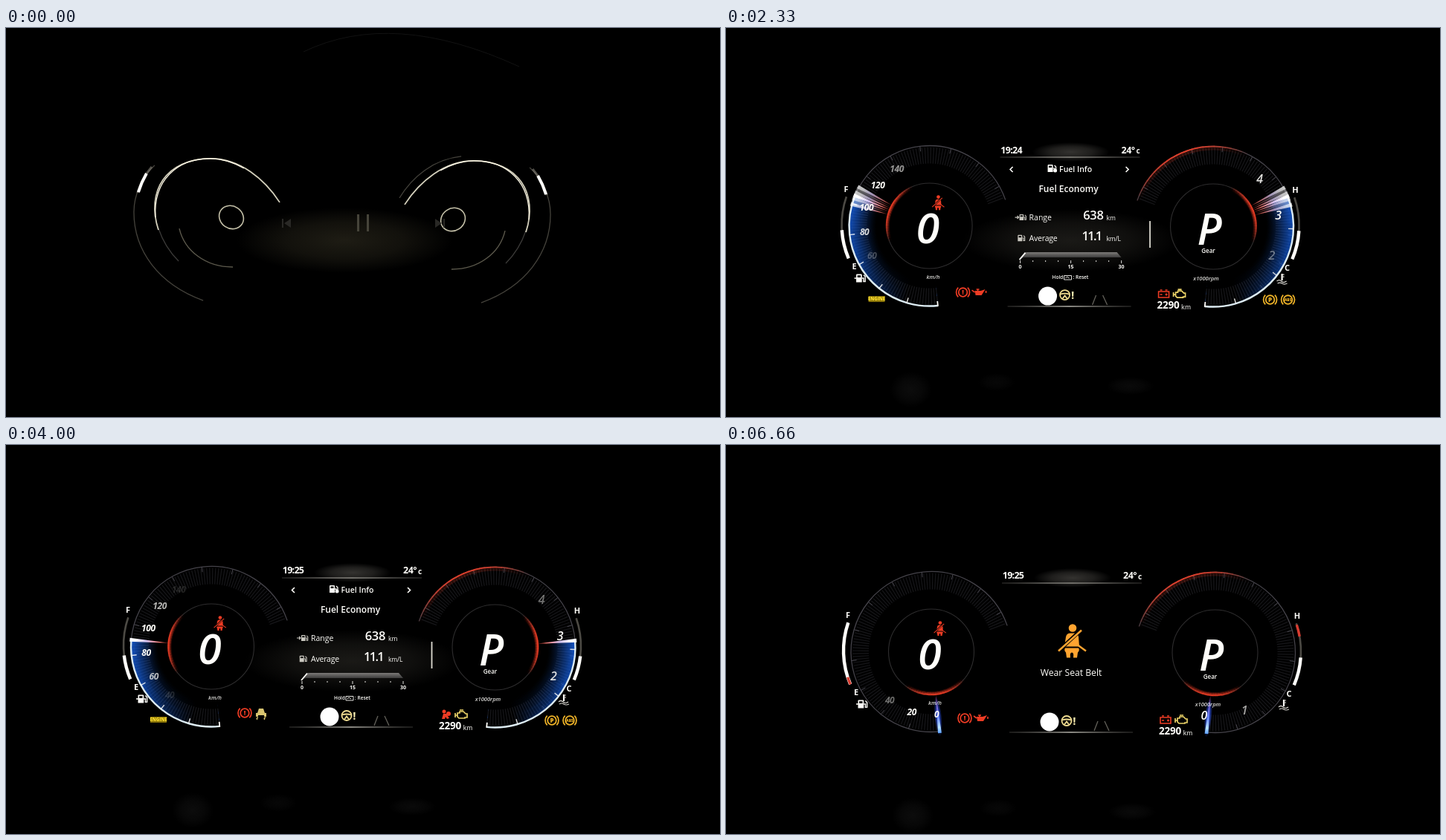
These frames come from a looping animation (960x524 px, 6.69 s). An HTML page with a canvas:

```html
<!DOCTYPE html>
<html lang="en">
<head>
<meta charset="utf-8">
<title>Instrument cluster</title>
<style>
html, body { margin: 0; width: 960px; height: 524px; overflow: hidden; background: #000; }
canvas { display: block; }
</style>
</head>
<body>
<canvas id="stage" width="960" height="524"></canvas>
<script>
const c = document.getElementById('stage').getContext('2d');
const LOOP = 6690, RAD = Math.PI / 180, ZERO = 84, R = 108;
const WHITE = '#fffefa', DIM = '#3b3a38', RED = '#ee3c24', AMBER = '#f0b428';

const clamp = v => Math.max(0, Math.min(1, v));
const ramp = (t, a, b) => clamp((t - a) / (b - a));

// Piecewise linear value through [time, value] points
function track(t, pts) {
  let v = pts[0][1];
  for (let i = 1; i < pts.length; i++) {
    const [a, x] = pts[i - 1], [b, y] = pts[i];
    if (t >= a) v = x + (y - x) * ramp(t, a, b);
  }
  return v;
}

function group(x, y, draw, { sx = 1, sy = 1, a = 1 } = {}) {
  c.save();
  c.translate(x, y);
  c.scale(sx, sy);
  c.globalAlpha *= a;
  draw();
  c.restore();
}

// y is the middle of the capitals
function text(s, x, y, size, { w = 700, color = WHITE, align = 'center', italic = '', gap = 0, a = 1 } = {}) {
  c.save();
  c.font = `${italic} ${w} ${size}px "Open Sans", "Noto Sans", sans-serif`;
  c.letterSpacing = gap + 'px';
  c.textAlign = align;
  c.globalAlpha *= a;
  c.fillStyle = color;
  c.fillText(s, x, y + size * .357);
  c.restore();
}

function stroke(d, color, width = 1, a = 1) {
  c.save();
  c.globalAlpha *= a;
  c.strokeStyle = color;
  c.lineWidth = width;
  c.stroke(new Path2D(d));
  c.restore();
}

function fill(d, color) {
  c.fillStyle = color;
  c.fill(new Path2D(d));
}

function disc(x, y, r, color) {
  c.beginPath();
  c.arc(x, y, r, 0, 7);
  c.fillStyle = color;
  c.fill();
}

function arc(r, from, to, color, width = 1, a = 1) {
  c.save();
  c.globalAlpha *= a;
  c.beginPath();
  c.arc(0, 0, r, from * RAD, to * RAD);
  c.strokeStyle = color;
  c.lineWidth = width;
  c.stroke();
  c.restore();
}

function tick(angle, r1, r2, color, width, a = 1) {
  const x = Math.cos(angle * RAD), y = Math.sin(angle * RAD);
  stroke(`M${x * r1} ${y * r1}L${x * r2} ${y * r2}`, color, width, a);
}

function glow(x, y, rx, ry, rgb, a) {
  group(x, y, () => {
    const g = c.createRadialGradient(0, 0, 0, 0, 0, 1);
    g.addColorStop(0, `rgba(${rgb},${a})`);
    g.addColorStop(.55, `rgba(${rgb},${a * .6})`);
    g.addColorStop(1, `rgba(${rgb},0)`);
    disc(0, 0, 1, g);
  }, { sx: rx, sy: ry });
}

function fadeLine(x1, x2, y, a = 1) {
  const g = c.createLinearGradient(x1, 0, x2, 0);
  g.addColorStop(0, 'rgba(90,88,84,.4)');
  g.addColorStop(.5, '#b8b6ae');
  g.addColorStop(1, 'rgba(90,88,84,.4)');
  stroke(`M${x1} ${y}H${x2}`, g, 1.5, a);
}

// Welcome arcs, left half; the right half is its mirror image
function welcomeHalf(right) {
  stroke('M265 367C205 345 172 300 172 248C172 225 183 200 200 185', '#45433c', 1.3);
  stroke('M177 222Q183 202 196 187', '#88857c', 3, .6);
  stroke('M178 221Q182 208 189 196', WHITE, 4);
  stroke('M232 314C222 304 211 288 205 270', DIM, 1.3);
  stroke('M205 272C188 220 215 176 275 176C315 176 348 204 368 235', '#d4d0bc', 1.8);
  stroke('M201 255C198 205 230 176 275 176C290 176 305 181 320 189', '#fffae8', 1.2);
  stroke('M233 270C240 300 268 322 305 322', '#5c594c', 1.4);
  if (right) stroke('M375 226C358 198 330 174 292 170', '#45433c', 1.2);
  c.beginPath();
  c.ellipse(303, 255, 17, 15, .6, 0, 7);
  c.strokeStyle = '#c4c0a8';
  c.lineWidth = 1.6;
  c.stroke();
}

function welcome(t) {
  const p = ramp(t, 0, 620), a = 1 - ramp(t, 60, 620);
  if (!a) return;
  for (const right of [false, true]) {
    group(right ? 904 : 0, right ? 3 : 0, () => {
      c.translate(270, 262);
      c.rotate(-p * .7);
      c.scale(1 + p * .18, 1 + p * .18);
      c.translate(-270, -262);
      welcomeHalf(right);
    }, { sx: right ? -1 : 1, a });
  }
  stroke('M400 32Q520 -26 690 52', '#121212', 1, a);
  group(0, 0, () => {
    fill('M472 251h3v23h-3zM485 251h3v23h-3z', '#46443a');
    fill('M371 257h2v12h-2zM383 257v12l-9-6zM577 257v12l9-6zM588 257h2v12h-2z', '#2a2926');
  }, { a: 1 - ramp(t, 0, 250) });
}

function needle(angle, a, rest) {
  const g = c.createRadialGradient(0, 0, 54, 0, 0, R + 3);
  g.addColorStop(0, 'rgba(255,50,30,0)');
  g.addColorStop(.25, rest ? '#8458c0' : '#f07068');
  g.addColorStop(.6, rest ? '#6a88ff' : '#d4c4f4');
  g.addColorStop(.85, rest ? '#b8e4ff' : '#fff');
  g.addColorStop(1, rest ? '#5098ff' : '#fff');
  c.save();
  c.rotate(angle * RAD);
  c.globalAlpha *= a;
  fill(`M54 0L${R + 2} -2.4V2.4Z`, g);
  c.restore();
}

// Drawn for the left dial; the caller mirrors it for the right one
function dial(t, s, dim, lit, right) {
  arc(R, ZERO, 341, '#45434a', 1.3, dim);
  arc(57.5, 0, 360, '#2e2d2e', 1.1, dim);
  for (let d = 0; d <= 256; d += 2.2) tick(ZERO + d, R - 24, R - 2, '#17171a', 1.2, dim * lit);
  for (let d = 22.4; d < 256; d += 22.4) tick(ZERO + d, R - 7, R, '#4a4850', 1, dim * lit);
  if (right) {
    for (let i = 0; i < 24; i++) {
      const near = Math.sin((i + .5) / 24 * Math.PI);
      arc(R, 245 + i * 4, 249.3 + i * 4, '#e0402c', 2, lit * near);
      arc(R - 3, 245 + i * 4, 249.3 + i * 4, '#e0402c', 4, lit * near * .2);
    }
  }
  if (!lit) return;
  c.save();
  c.globalAlpha *= lit;
  const end = ZERO + s;
  if (s > 1) {
    const g = c.createConicGradient(ZERO * RAD, 0, 0);
    g.addColorStop(s * .2 / 360, 'rgba(18,92,220,0)');
    g.addColorStop(s * .65 / 360, 'rgba(18,92,220,.85)');
    g.addColorStop(s / 360, 'rgba(24,100,235,1)');
    for (let r = 72; r < R; r++) arc(r, ZERO, end, g, 1.4, .75 * ((r - 71) / 36) ** 1.5);
    arc(R, ZERO, end, '#dcebf2', 2.4);
    tick(ZERO, R - 6, R + 1, WHITE, 1.8);
    for (let d = 22.4; d < s; d += right ? 36 : 22.4) tick(ZERO + d, R - 7, R, WHITE, 1.4, .8);
  }
  for (let i = -12; i < 12; i++) {
    const near = Math.cos((i + .5) / 12 * Math.PI / 2), from = end + i * 3.6;
    for (let k = 0; k < 4; k++) arc(58 - k * 1.2, from, from + 3.9, RED, 1.6, near * (1 - k * .27));
  }
  const moving = t > 1800 && t < 3500;
  if (moving) for (let i = -3; i <= 3; i++) needle(end + i * 2.2, i % 2 ? .75 : .35, s < 30 && i < 1);
  if (s < 30) {
    c.save();
    c.rotate(end * RAD);
    glow(88, 0, 27, 5 + Math.min(s, 14) * .4, '50,90,255', .85);
    c.restore();
  }
  needle(end, 1, s < 5);
  c.restore();
}

function numbers(values, cx, cy, r, zero, step, s, size) {
  values.forEach((v, i) => {
    const d = i * Math.abs(step), angle = (zero + i * step) * RAD;
    const shine = clamp(1.08 - (Math.abs(d - s) - 20) / 38);
    text(v, cx + Math.cos(angle) * r, cy + Math.sin(angle) * r, size,
      { italic: 'italic', w: size > 14 ? 600 : 700, a: shine, gap: -.4 });
  });
}

function sideBar(level, warn, dim, lit) {
  arc(116, 157, 199, '#4c4a44', 2.6, dim);
  if (level > 0) arc(116, 157, 157 + 42 * level, WHITE, 4.4, lit);
  if (warn) arc(116, ...warn, '#d83c30', 3.4, lit);
}

function belt(color) {
  disc(1, -17, 5.3, color);
  fill('M-8 -5Q-7 -10 -2 -10H4Q8 -10 9 -5L10 8H-10Z', color);
  fill('M-9 10H9Q11 13 8 16L7 23H2Q3 16 0 16Q-3 16 -2 23H-7L-8 16Q-11 13 -9 10Z', color);
  stroke('M13 -15L-17 13', '#000', 5);
  stroke('M13 -14L-18 14M8 6L19 14', color, 2.4);
}

function pump(color) {
  fill('M-5 5V-4Q-5 -5 -4 -5H1Q2 -5 2 -4V5Z', color);
  fill('M-3.5 -3.5H.5V-1H-3.5Z', '#000');
  stroke('M2 0H4V4H6V-2L4 -4', color, 1.3);
}

function ringLamp(x, y, label, color, size) {
  group(x, y, () => {
    arc(5.8, 0, 360, color, 1.8);
    arc(9, 135, 225, color, 1.7);
    arc(9, -45, 45, color, 1.7);
    text(label, 0, 0, size, { w: 800, color });
  });
}

function lamps(t) {
  const swapped = t > 3400 && t < 4700;
  ringLamp(320, 357, '!', RED, 9);
  group(342, 357, () => {
    if (swapped) {
      fill('M-5 0L-3 -6H3L5 0H7V5H4V3H-4V5H-7V0Z', '#d8c470');
      stroke('M-5 9Q-7 7 -4 6M5 9Q3 7 6 6', '#d8c470', 1.4);
    } else {
      fill('M-6 -2H2L8 -4L3 4H-5Z', RED);
      stroke('M-6 0L-10 -3M-2 -2V-4M-4 -4H0M9 -2V1', RED, 1.6);
    }
  });
  group(590, 359, () => {
    if (swapped) {
      disc(-2, -4, 2.5, RED);
      fill('M-5 6L-3 -1L1 -1L5 5L2 6L0 3L-1 6Z', RED);
      disc(4, -1, 3, RED);
    } else {
      stroke('M-7 -3H7V5H-7ZM-5 -5H-2M2 -5H5M-5 1H-2M2 1H5M3.5 -.5V2.5', RED, 1.6);
    }
  });
  group(611, 359, () => stroke('M-5 -2H-2V-4H3L6 -1H8V4H5V5H-3L-5 3ZM-8 -2V4M-8 1H-5M-2 -6H3', '#ecd468', 1.7));
  if (t < 4700) {
    fill('M193 362H215V370H193Z', '#8a7408');
    text('ENGINE', 204, 366, 6, { w: 800, color: '#ffe030' });
    ringLamp(733, 367, 'P', AMBER, 8);
    ringLamp(757, 367, 'ABS', AMBER, 5);
  }
  group(286.5, 236, () => belt(RED), { sx: .44, sy: .44 });
  disc(434, 362, 12.5, '#fff');
  group(457, 360.5, () => {
    arc(6.5, 0, 360, '#f0dc90', 1.8);
    stroke('M-6 -1Q0 -3 6 -1M-3 5L0 1L3 5', '#f0dc90', 1.8);
    text('!', 10.5, 0, 15, { color: '#f8ecb0' });
  });
  stroke('M494 374L499 361M508 361L514 374', '#63615a', 1.3);
}

function fuelInfo() {
  glow(465, 287, 145, 42, '58,56,50', .45);
  stroke('M387 188L383.5 191.5L387 195M539 188L542.5 191.5L539 195', WHITE, 1.6);
  group(439, 190, () => pump(WHITE));
  disc(444, 193, 2.5, WHITE);
  text('Fuel Info', 471.5, 191.5, 10.5, { w: 600 });
  text('Fuel Economy', 462, 217.5, 12, { w: 600 });
  group(400, 256, () => pump('#cac8c0'), { sx: .8, sy: .8 });
  stroke('M390 256H395M393 254L395 256L393 258', '#cac8c0', 1.2);
  group(398, 284, () => pump('#cac8c0'), { sx: .85, sy: .85 });
  text('Range', 409, 256, 10.5, { w: 500, align: 'left' });
  text('Average', 409, 284, 10.5, { w: 500, align: 'left', gap: -.2 });
  text('638', 509, 253.5, 16.5, { w: 600, align: 'right', gap: -.3 });
  text('km', 513, 256.5, 8.5, { w: 500, align: 'left' });
  text('11.1', 506, 281.5, 16.5, { w: 600, align: 'right', gap: -1.7 });
  text('km/L', 513, 284.5, 8.5, { w: 500, align: 'left', gap: -.2 });
  const g = c.createLinearGradient(0, 303, 0, 312);
  g.addColorStop(0, '#7c7a78');
  g.addColorStop(1, '#2a2a2a');
  fill('M397 312L405 303H527L533 310H402Z', g);
  stroke('M396 313L404 303.5', WHITE, 1.8);
  for (let i = 0; i <= 8; i++) stroke(`M${397 + i * 17} 314v${i % 4 ? 2 : 4}`, WHITE, 1.2, .75);
  ['0', '15', '30'].forEach((s, i) => text(s, 397 + i * 68, 322, 7));
  text('Hold', 440, 337, 6.5, { w: 600, align: 'left' });
  stroke('M456 334.5H466V340H456ZM458 338L460 336L463 338', WHITE, .9);
  text(': Reset', 468, 337, 6.5, { w: 600, align: 'left' });
  stroke('M571.5 261V297', '#dcdad0', 1.8);
}

function beltNotice(t) {
  const p = ramp(t, 5500, 5900), a = ramp(t, 5350, 5450);
  if (!a) return;
  const color = `rgb(${212 + 43 * p},${48 + 116 * p},${36 + 12 * p})`;
  group(464, 252.5, () => belt(color), { a });
  text('Wear Seat Belt', 463, 296, 12.2, { w: 500, a: a * (.62 + .38 * p) });
}

function reflections() {
  glow(250, 488, 28, 24, '40,40,40', .3);
  glow(365, 478, 25, 12, '40,40,40', .18);
  glow(545, 483, 32, 12, '40,40,40', .25);
}

function cluster(t) {
  const dim = ramp(t, 350, 800) * (.7 + .3 * ramp(t, 1200, 1500));
  const lit = ramp(t, 1300, 1600);
  if (!dim) return;
  const s = track(t, [[1797, 0], [2900, 244], [3250, 244], [4000, 101], [4550, 0]]);
  const fuel = track(t, [[1800, 0], [1860, .06], [2760, .83], [3000, 1], [3250, 1], [4000, .39], [4500, .3], [5530, .7], [6660, 1]]);
  const temp = track(t, [[1800, 0], [1860, .06], [2760, .83], [3000, 1], [3250, 1], [4000, .39], [4500, .35], [5530, .45]]);
  c.save();
  c.translate(
    track(t, [[0, -8], [960, -6], [1860, -3], [2760, 0], [4000, 1]]),
    track(t, [[960, -4], [1860, -2], [2760, 0], [4000, 4], [5530, 7.5], [6660, 11]]));
  fadeLine(370, 558, 175, dim);
  fadeLine(380, 546, 376, dim);
  group(273, 266, () => sideBar(fuel, t > 4700 && [157, 162], dim, lit));
  group(656, 267, () => sideBar(temp, t > 4700 && [190, 198], dim, lit), { sx: -1 });
  group(275, 267.5, () => dial(t, s, dim, lit, false));
  group(656.5, 268.5, () => dial(t, s, dim, lit, true), { sx: -1 });

  if (lit) group(0, 0, () => {
    reflections();
    glow(465, 168, 52, 13, '74,72,68', .7);
    numbers([...Array(12).keys()].map(i => i * 20), 273, 266, 86, ZERO, 22.4, s, 12);
    numbers([...Array(8).keys()], 657, 267, 88, 100, -36.3, s, 16);
    text(t < 3400 ? '19:24' : '19:25', 385, 165, 12.5, { gap: -.7 });
    text('24°', 533, 165, 12.5, { align: 'left', gap: -.5 });
    text('c', 553, 166, 10, { align: 'left' });
    text('0', 273, 270.5, 57, { w: 600, italic: 'italic' });
    text('P', 651.5, 272, 58, { w: 600, italic: 'italic' });
    text('Gear', 650, 301.5, 8, { w: 600 });
    text('km/h', 280, 336, 7.5, { w: 600, italic: 'italic', a: .85 });
    text('x1000rpm', 647, 338, 7.5, { w: 600, italic: 'italic', a: .85 });
    text('2290', 581, 374.5, 13.5, { align: 'left', gap: -.2 });
    text('km', 613.5, 376.5, 8.5, { w: 600, align: 'left', a: .8 });
    text('F', 163, 218, 11);
    text('E', 174, 322, 11);
    text('H', 767, 219.5, 11);
    text('C', 756, 324, 11);
    group(182, 338, () => pump(WHITE), { sx: 1.1, sy: 1.1 });
    stroke('M174 338H178', WHITE, 1.5);
    stroke('M749 332V341', WHITE, 2.2);
    stroke('M749 333H752M749 336H752M742 342Q745 339 748 342T755 342M743 345Q746 343 749 345T756 345', '#d8d6d0', 1.2);
    lamps(t);
    const info = ramp(t, 1450, 1650) * (1 - ramp(t, 5150, 5300));
    if (info) group(0, 0, fuelInfo, { a: info });
    beltNotice(t);
  }, { a: lit });
  c.restore();
}

const start = performance.now();

function frame() {
  const t = (performance.now() - start) % LOOP;
  c.fillStyle = '#000';
  c.fillRect(0, 0, 960, 524);
  glow(455, 286, 145, 44, '60,56,40', .5 * (1 - ramp(t, 1450, 1650)));
  welcome(t);
  cluster(t);
  requestAnimationFrame(frame);
}
frame();
</script>
</body>
</html>
```
